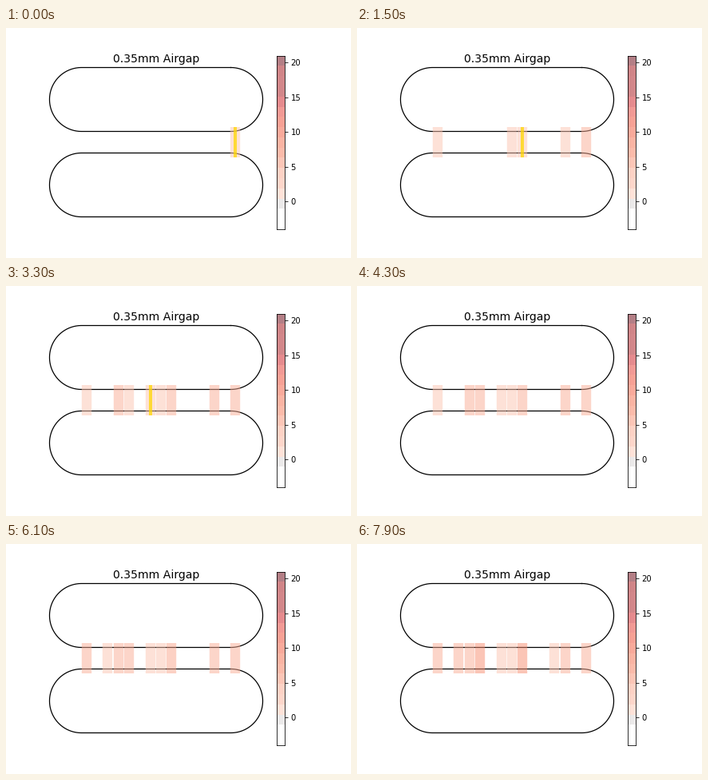
Recreate the animation shown at these times as a matplotlib script. Size 432 by 288 pixels, loop 8000 ms.

```python
import numpy as np
import matplotlib.pyplot as plt
from matplotlib.animation import FuncAnimation
from matplotlib.colors import ListedColormap

W, H, DPI = 432, 288, 72
TICK = 100           # ms per frame
FRAMES = 80
PERIOD = 3           # frames between two discharges
ALPHA = 0.5

plt.rcParams["font.family"] = "DejaVu Sans"

# Slot hit by each discharge, in order of time
HITS = [14, 7, 14, 12,
        0, 8, 8, 12,
        3, 3, 4, 6,
        3, 8, 4, 4,
        0, 12, 2, 8,
        0, 8, 11, 14,
        4, 2, 4]
SLOTS = 15

# Count scale, lowest band first
VMIN, VMAX = -4, 21
BANDS = ["#ffffff", "#ffffff", "#ebe9e9", "#fee2d8", "#fdd6ca", "#fdd2c5",
         "#fcc6b7", "#fbbbaa", "#fab4a3", "#f9aa9b", "#f7a195", "#f29a95",
         "#e58b8e", "#d2878a", "#d2878a", "#d08588", "#b47f86"]
CMAP = ListedColormap(BANDS)


def band_color(count):
    """Opaque colour that shows as the band colour once blended over white."""
    i = int((count - VMIN) / (VMAX - VMIN) * len(BANDS))
    shown = np.array(CMAP(i)[:3])
    return np.clip((shown - (1 - ALPHA)) / ALPHA, 0, 1)


def slot_x(k):
    return 100.7 + 13.33 * k


def stadium(ax, top, left=54.5, right=321.5, r=40):
    t = np.linspace(-np.pi / 2, np.pi / 2, 60)
    x = np.concatenate([right - r + r * np.cos(t), left + r - r * np.cos(t)])
    y = top + r + r * np.concatenate([np.sin(t), -np.sin(t)])
    ax.plot(np.append(x, x[0]), np.append(y, y[0]),
            color="black", lw=1.25, snap=False, zorder=1)


def gap_line(width, color, alpha, zorder):
    return ax.plot([0, 0], [124, 162], lw=width, color=color, alpha=alpha,
                   solid_capstyle="butt", zorder=zorder, visible=False)[0]


fig = plt.figure(figsize=(W / DPI, H / DPI), dpi=DPI, facecolor="white")
ax = fig.add_axes([0, 0, 1, 1])
ax.set_xlim(0, W)
ax.set_ylim(H, 0)
ax.axis("off")

stadium(ax, 49.5)
stadium(ax, 156.5)
ax.text(187.92, 43, "0.35mm Airgap", fontsize=14, ha="center", va="baseline")

cax = fig.add_axes([338.58 / W, 0.125, 10.872 / W, 0.755])
cax.pcolormesh([0, 1], np.linspace(VMIN, VMAX, len(BANDS) + 1),
               np.arange(len(BANDS))[:, None], cmap=CMAP)
cax.set_xticks([])
cax.yaxis.tick_right()
cax.set_yticks(range(0, 21, 5))
cax.set_ylim(VMIN, VMAX)

bars = [gap_line(12.4, "white", ALPHA, 2) for _ in range(SLOTS)]
for k, bar in enumerate(bars):
    bar.set_xdata([slot_x(k)] * 2)
spark = gap_line(4, "gold", 0.75, 3)


def update(frame):
    n, phase = divmod(frame, PERIOD)
    counts = np.bincount(HITS[:n + 1], minlength=SLOTS)
    for bar, count in zip(bars, counts):
        bar.set_visible(count > 0)
        bar.set_color(band_color(count))
    spark.set_visible(phase == 0)
    spark.set_xdata([slot_x(HITS[n])] * 2)
    return [*bars, spark]


anim = FuncAnimation(fig, update, frames=FRAMES, interval=TICK,
                     repeat=True, repeat_delay=0, blit=False)
plt.show()
```
